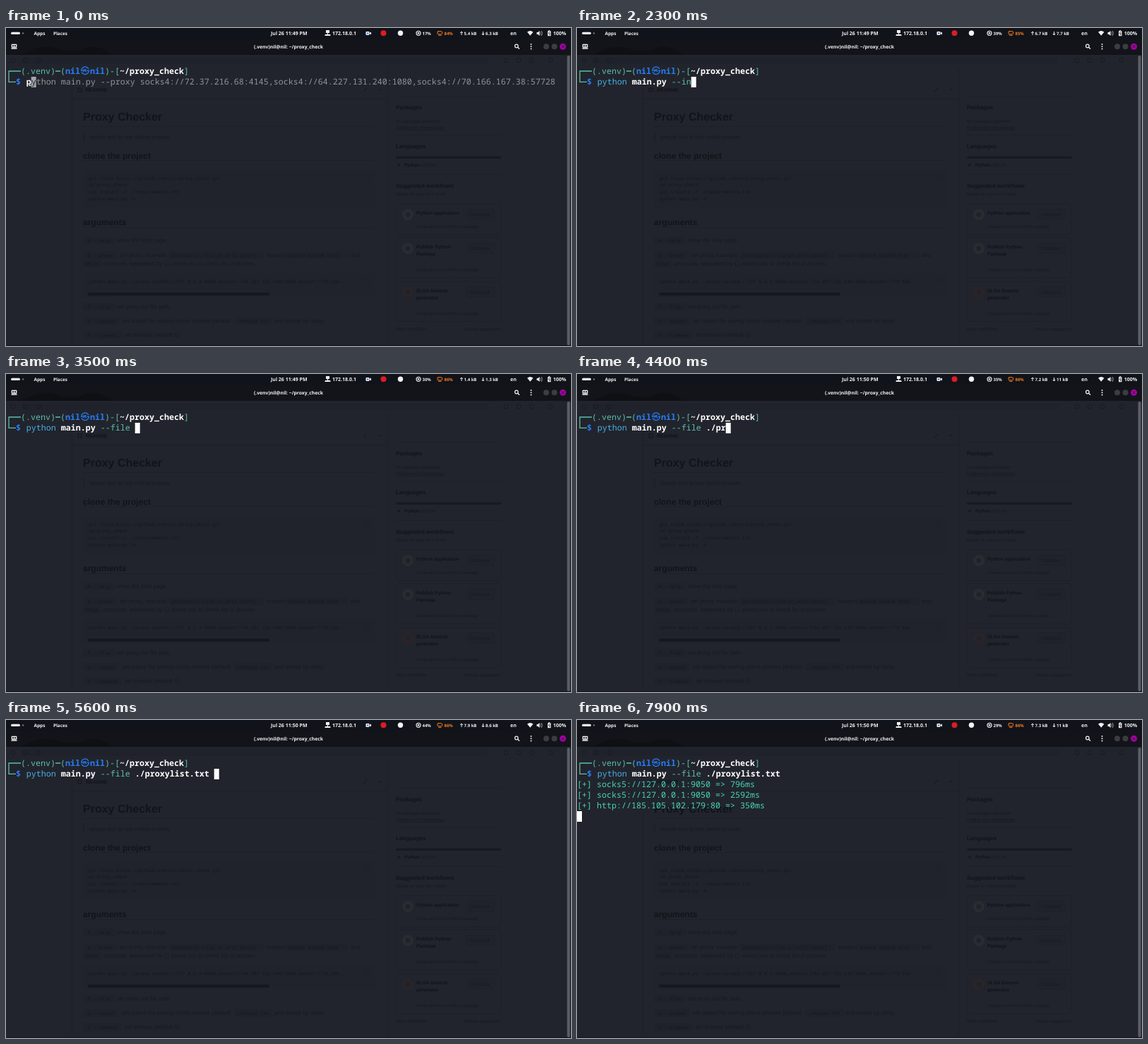
These frames come from a looping animation (800x450 px, 8000 ms). An HTML page:

```html
<!DOCTYPE html>
<html lang="en">
<head>
<meta charset="utf-8">
<title>Terminal session</title>
<style>
html, body { margin: 0; width: 100%; height: 100%; overflow: hidden; background: #21242c; }
svg { display: block; width: 800px; height: 450px; }
text { white-space: pre; text-rendering: geometricPrecision; }
.term { font: 500 11.667px "Noto Sans Mono", "DejaVu Sans Mono", monospace; }
.bar { font: 700 7px "Noto Sans", sans-serif; fill: #f2f2f2; }
.page { font: 8px "Liberation Sans", sans-serif; fill: #12141a; }
.code { font-family: "Liberation Mono", monospace; }
</style>
</head>
<body>
<svg id="stage" viewBox="0 0 800 450" xmlns="http://www.w3.org/2000/svg">
  <rect width="800" height="450" fill="#21242c"/>
  <g id="page" class="page"></g>
  <rect width="800" height="38" fill="#12141a"/>
  <path d="M22 38Q50 22 72 29T112 29T150 38z" fill="#0e1014"/>
  <rect width="800" height="15" fill="#11131a"/>
  <rect y="449" width="800" height="1" fill="#121419"/>
  <rect x="794.500" y="39" width="4" height="410" rx="2" fill="#5b5e65"/>

  <g id="icons" fill="#f2f2f2" stroke-linecap="round" stroke-linejoin="round">
    <rect x="7" y="5.700" width="13" height="3.400" rx="1.700"/>
    <circle cx="24" cy="7.400" r="1.200" fill="#777"/>
    <path d="M453 3h5v4h-5zM455 7h1v2h3v2h-7v-2h3z"/>
    <path d="M451.500 9.500h8v1.500h-8z"/>
    <rect x="509.500" y="5" width="5" height="5" rx="1"/>
    <path d="M514.500 7l2.500-1.500v4l-2.500-1.500z"/>
    <rect x="511" y="6.300" width="2.200" height="2.300" fill="#3584e4"/>
    <circle cx="534.500" cy="7.300" r="4" fill="#e01b24"/>
    <circle cx="558.500" cy="7.300" r="3.700"/>
    <circle cx="584" cy="7.300" r="3" fill="none" stroke="#d8d8d8" stroke-width="1.300"/>
    <circle cx="584" cy="7.300" r="1.300"/>
    <rect x="611" y="4.800" width="6.500" height="4" rx="1" fill="none" stroke="#f57c1f" stroke-width="1"/>
    <path d="M612.500 10.400h3.600" stroke="#f57c1f"/>
    <path d="M738 5.700q4.200-3.600 8.400 0l-4.200 5z"/>
    <path d="M751.500 6h1.800l2.200-2v7l-2.200-2h-1.800z"/>
    <path d="M757 5.500q1.300 2 0 4M758.500 4.300q2.200 3.200 0 6.400" fill="none" stroke="#aaa" stroke-width=".8"/>
    <path d="M768.300 3.300h1.800v1h1.300v7h-4.400v-7h1.300z"/>
    <path d="M769.500 5.200l-1.300 2.700h2l-.8 2" fill="none" stroke="#000" stroke-width=".7"/>

    <path d="M8.300 23.500h6.400v3.500h-6.400zM8 29h7" fill="none" stroke="#f2f2f2" stroke-width="1.300"/>
    <path d="M11.500 24v3" stroke="#f2f2f2"/>
    <circle cx="722.800" cy="25.500" r="2.300" fill="none" stroke="#f2f2f2" stroke-width="1.200"/>
    <path d="M724.600 27.300l2 2" stroke="#f2f2f2" stroke-width="1.300"/>
    <circle cx="743.500" cy="23" r="1"/><circle cx="743.500" cy="26.300" r="1"/><circle cx="743.500" cy="29.600" r="1"/>
    <circle cx="765" cy="26.300" r="4" fill="#3b3d43"/>
    <circle cx="776.500" cy="26.300" r="4" fill="#3b3d43"/>
    <circle cx="788.500" cy="26.300" r="4.500" fill="#a300a3"/>
    <path d="M787 24.800l3 3m0-3l-3 3" stroke="#1b061b" stroke-width=".9"/>
  </g>
  <g id="bar" class="bar"></g>

  <path d="M21 61H4V76.300H14M70 61H77" fill="none" stroke="#5ebdab" stroke-width="1.300"/>
  <g id="prompt" class="term"></g>
  <g id="live" class="term"></g>
</svg>
<script>
const CELL = 7, LINE = 15, FIRST_BASE = 64.7, INPUT_X = 28.7, LOOP = 8000;
const TEAL = '#5ebdab', BLUE = '#277fff', CYAN = '#49aee6', MINT = '#47d4b9', WHITE = '#fff', GREY = '#92949a', BACK = '#21242c';
const $ = id => document.getElementById(id);
const NS = 'http://www.w3.org/2000/svg';

function add(parent, tag, attrs, content) {
  const el = document.createElementNS(NS, tag);
  for (const key in attrs) el.setAttribute(key, attrs[key]);
  if (content !== undefined) el.textContent = content;
  parent.appendChild(el);
  return el;
}
const label = (parent, x, y, content, attrs = {}) => add(parent, 'text', { x, y, ...attrs }, content);
const box = (parent, x, y, width, height, fill, extra = {}) => add(parent, 'rect', { x, y, width, height, fill, ...extra });

// Each glyph sits on its terminal cell.
function cells(parent, x, row, content, fill, bold, extra = {}) {
  const xs = [...content].map((_, i) => (x + i * CELL).toFixed(1)).join(' ');
  return label(parent, xs, FIRST_BASE + row * LINE, content, { fill, 'font-weight': bold ? 700 : 500, ...extra });
}

function drawPage() {
  const g = $('page');
  const INK = '#12141a', EDGE = '#1d2027', PANEL = '#20232b', CHIP = '#1f222a';
  const frame = { stroke: EDGE, 'stroke-width': 1, rx: 3 };
  const bold = size => ({ 'font-weight': 700, 'font-size': size });
  const dim = { fill: '#171a20' };
  const mono = size => ({ class: 'code', 'font-size': size, fill: '#14171d' });

  box(g, 22, 42, 660, 9, CHIP, { rx: 4 });
  for (const x of [10, 27, 46, 708, 726, 744, 771]) add(g, 'circle', { cx: x, cy: 46, r: 3, fill: 'none', stroke: '#181a20' });
  add(g, 'path', { d: 'M93.500 76V447M540.500 56V447M93 100.500H540', stroke: EDGE, fill: 'none' });
  add(g, 'path', { d: 'M506 90l5-5M527 87h4M102 85h5v5h-5z', stroke: INK, fill: 'none' });
  label(g, 113, 90, 'README', bold(7));
  label(g, 109, 131, 'Proxy Checker', bold(16));
  add(g, 'path', { d: 'M109 139.500H523M109 187.500H523M109 282.500H523', stroke: EDGE });
  box(g, 109, 148, 2, 12, '#1b1e25');
  label(g, 118, 157, 'simple tool to test online proxies', dim);
  label(g, 109, 185, 'clone the project', bold(12));
  box(g, 109, 201, 414, 54, PANEL, { rx: 3 });
  ['git clone https://github.com/nil/proxy_check.git', 'cd proxy_check', 'pip install -r ./requirements.txt', 'python main.py -h']
    .forEach((s, i) => label(g, 117, 214.5 + i * 9.8, s, mono(6.5)));
  box(g, 508, 207, 7, 7, 'none', frame);
  label(g, 109, 279, 'arguments', bold(12));

  const chip = (x, y, w, s) => { box(g, x, y - 8, w, 11, CHIP, { rx: 3 }); label(g, x + 3, y, s, mono(6.5)); };
  chip(109, 303, 45, '-h --help');
  label(g, 157, 303, 'show the help page.', dim);
  chip(109, 324, 49, '-p --proxy');
  label(g, 161, 324, 'set proxy, example:', dim);
  chip(230, 324, 135, '[protocol]://[ip_or_url]:[port]');
  label(g, 370, 324, 'support', dim);
  chip(397, 324, 88, 'socks4 socks5 http');
  label(g, 488, 324, 'and', dim);
  chip(109, 336, 26, 'https');
  label(g, 138, 336, 'protocols. separated by (,) allows you to check list of proxies.', dim);
  box(g, 109, 347, 414, 34, PANEL, { rx: 3 });
  label(g, 117, 361, 'python main.py --proxy socks5://127.0.0.1:9050,socks4://64.227.131.240:1080,socks4://70.166...', mono(6.5));
  box(g, 116, 374.5, 257, 4, '#14171d', { rx: 2 });
  box(g, 508, 354, 7, 7, 'none', frame);
  chip(109, 397, 45, '-f --file');
  label(g, 157, 397, 'set proxy list file path.', dim);
  chip(109, 417, 51, '-o --output');
  label(g, 164, 417, 'set output file saving online proxies (default:', dim);
  chip(323, 417, 55, './output.txt');
  label(g, 380, 417, 'and sorted by delay.', dim);
  chip(109, 437, 55, '-t --timeout');
  label(g, 168, 437, 'set timeout (default 5).', dim);

  label(g, 552, 115, 'Packages', bold(8));
  label(g, 552, 134, 'No packages published', { ...dim, 'font-size': 6 });
  label(g, 552, 143, 'Publish your first package', { ...dim, 'font-size': 6, 'text-decoration': 'underline' });
  label(g, 552, 170, 'Languages', bold(8));
  box(g, 552, 181.5, 149, 3.5, '#161a22', { rx: 1.7 });
  add(g, 'circle', { cx: 556, cy: 194, r: 2, fill: '#161a22' });
  label(g, 564, 196, 'Python', bold(6.5));
  label(g, 588, 196, '100.0%', { ...dim, 'font-size': 6 });
  label(g, 552, 226, 'Suggested workflows', bold(8));
  label(g, 552, 237, 'Based on your tech stack', { ...dim, 'font-size': 6.3 });
  add(g, 'path', { d: 'M552 96.500H701M552 151.500H701M552 207.500H701', stroke: EDGE });
  [[248, 44, 'Python application', ''], [296, 57, 'Publish Python', 'Package'], [358, 57, 'SLSA Generic', 'generator']]
    .forEach(([y, h, first, second], i) => {
      box(g, 552.5, y + .5, 148, h, 'none', frame);
      add(g, 'circle', { cx: 569, cy: y + 16, r: 8, fill: i === 2 ? '#2a2429' : '#292c31' });
      add(g, 'circle', { cx: 569, cy: y + 16, r: 3.5, fill: '#1f2228' });
      label(g, 581, y + 16, first, bold(6.8));
      label(g, 581, y + 26, second, bold(6.8));
      box(g, 652.5, y + 8.5, 39, 14, PANEL, frame);
      label(g, 657, y + 18, 'Configure', { ...dim, 'font-size': 6.5 });
      label(g, 581, y + h - 9, 'Create and test a Python package', { ...dim, 'font-size': 5.8 });
    });
  label(g, 552, 428, 'More workflows', { ...dim, 'font-size': 6.3 });
  label(g, 649, 428, 'Dismiss suggestions', { ...dim, 'font-size': 5.7 });
}

function drawPrompt() {
  const g = $('prompt');
  cells(g, 21, 0, '(.venv)', TEAL);
  cells(g, 77, 0, '(', TEAL);
  cells(g, 84, 0, 'nil', BLUE, true);
  label(g, 112, FIRST_BASE + .4, '㉿', { fill: BLUE, 'text-anchor': 'middle', 'font-family': '"Noto Sans CJK KR", "Noto Sans CJK JP", sans-serif', 'font-size': 12.5, 'font-weight': 700 });
  cells(g, 119, 0, 'nil', BLUE, true);
  cells(g, 140, 0, ')-[', TEAL);
  cells(g, 161, 0, '~/proxy_check', WHITE, true);
  cells(g, 252, 0, ']', TEAL);
  cells(g, 14, 1, '$', BLUE, true);
}

const HISTORY = 'python main.py --proxy socks4://72.37.216.68:4145,socks4://64.227.131.240:1080,socks4://70.166.167.38:57728';
const BASE = 'python main.py --';
// Keyed by start time in ms.
const EDITS = [
  [1700, BASE], [2000, BASE + 'i'], [2200, BASE + 'in'], [2600, BASE + 'i'], [2700, BASE],
  [2900, BASE + 'f'], [3000, BASE + 'fi'], [3100, BASE + 'fil'], [3200, BASE + 'file'], [3400, BASE + 'file '],
  [3900, BASE + 'file .'], [4000, BASE + 'file ./'], [4200, BASE + 'file ./p'], [4300, BASE + 'file ./pr'],
  [4600, BASE + 'file ./pro'], [4800, BASE + 'file ./proxy'], [5300, BASE + 'file ./proxyl'], [5500, BASE + 'file ./proxylist.txt ']
];
const STATS = [
  [0, '17%', '84%', '5.4 kB', '6.3 kB'], [900, '42%', '86%', '12 kB', '15 kB'], [2000, '39%', '85%', '6.7 kB', '7.7 kB'],
  [3100, '30%', '86%', '1.4 kB', '1.3 kB'], [4100, '35%', '86%', '7.2 kB', '11 kB'], [5200, '44%', '86%', '7.9 kB', '8.6 kB'],
  [6800, '29%', '86%', '7.3 kB', '11 kB']
];
const OUTPUT = [
  [6500, '[+] socks5://127.0.0.1:9050 => 796ms'],
  [7400, '[+] socks5://127.0.0.1:9050 => 2592ms'],
  [7700, '[+] http://185.105.102.179:80 => 350ms']
];
const LISTING = [4900, 5500], ENTER = 5900, MINUTE = 4000;
const current = (list, t) => list.filter(item => item[0] <= t).pop();

const bar = $('bar');
label(bar, 39.5, 10, 'Apps', { 'font-size': 6.5 });
label(bar, 67, 10, 'Places', { 'font-size': 6.3 });
const clock = label(bar, 375, 10, '');
label(bar, 462, 10, '172.18.0.1');
const small = { 'font-size': 6 };
const meters = [
  label(bar, 589.5, 9.6, '', small),
  label(bar, 620.5, 9.6, '', { ...small, fill: '#f57c1f' }),
  label(bar, 648.5, 9.6, '', small),
  label(bar, 679, 9.6, '', small)
];
add(bar, 'path', { d: 'M645 10V5m-1.800 2L645 5l1.800 2M675.500 5v5m-1.800-2l1.800 2l1.800-2', fill: 'none', stroke: '#f2f2f2' });
label(bar, 714, 10, 'en');
label(bar, 774.8, 10, '100%');
label(bar, 400, 28.6, '(.venv)nil@nil: ~/proxy_check', { 'text-anchor': 'middle', 'font-size': 6.8 });

function drawInput(g, typed) {
  const put = (from, to, fill, bold, extra) =>
    typed.length > from && cells(g, INPUT_X + from * CELL, 1, typed.slice(from, to), fill, bold, extra);
  const known = typed.length >= 6;
  put(0, 6, known ? CYAN : WHITE, !known, typed.length === 1 ? { 'text-decoration': 'underline' } : {});
  put(7, 14, WHITE, true);
  put(15, 21, TEAL);
  put(22, undefined, WHITE, true);
}

function drawCursor(g, x, row, fill) {
  box(g, x, 54 + row * LINE, CELL, LINE, fill);
}

function render(t) {
  clock.textContent = t < MINUTE ? 'Jul 26 11:49 PM' : 'Jul 26 11:50 PM';
  const stats = current(STATS, t);
  meters.forEach((el, i) => { el.textContent = stats[i + 1]; });

  const g = $('live');
  g.replaceChildren();
  const typed = t < 1700 ? HISTORY.slice(0, 1 + t / 100) : current(EDITS, t)[1];
  drawInput(g, typed);

  if (t >= ENTER) {
    const lines = OUTPUT.filter(([start]) => start <= t);
    lines.forEach(([, line], i) => cells(g, 0, i + 2, line, MINT));
    drawCursor(g, 0, lines.length + 2, WHITE);
    return;
  }
  const x = INPUT_X + typed.length * CELL;
  const hinted = HISTORY.startsWith(typed);
  drawCursor(g, x, 1, hinted ? '#a3a5aa' : WHITE);
  if (hinted) {
    cells(g, x, 1, HISTORY[typed.length], BACK);
    cells(g, x + CELL, 1, HISTORY.slice(typed.length + 1), GREY);
  }
  if (t >= LISTING[0] && t < LISTING[1]) {
    cells(g, 0, 2, 'Completing file', WHITE);
    cells(g, 0, 3, 'proxy.py  proxylist.txt', WHITE);
  }
}

drawPage();
drawPrompt();
const start = performance.now();
let shown = -1;
function tick() {
  const t = Math.floor((performance.now() - start) % LOOP / 100) * 100;
  if (t !== shown) render(shown = t);
  requestAnimationFrame(tick);
}
tick();
</script>
</body>
</html>
```
